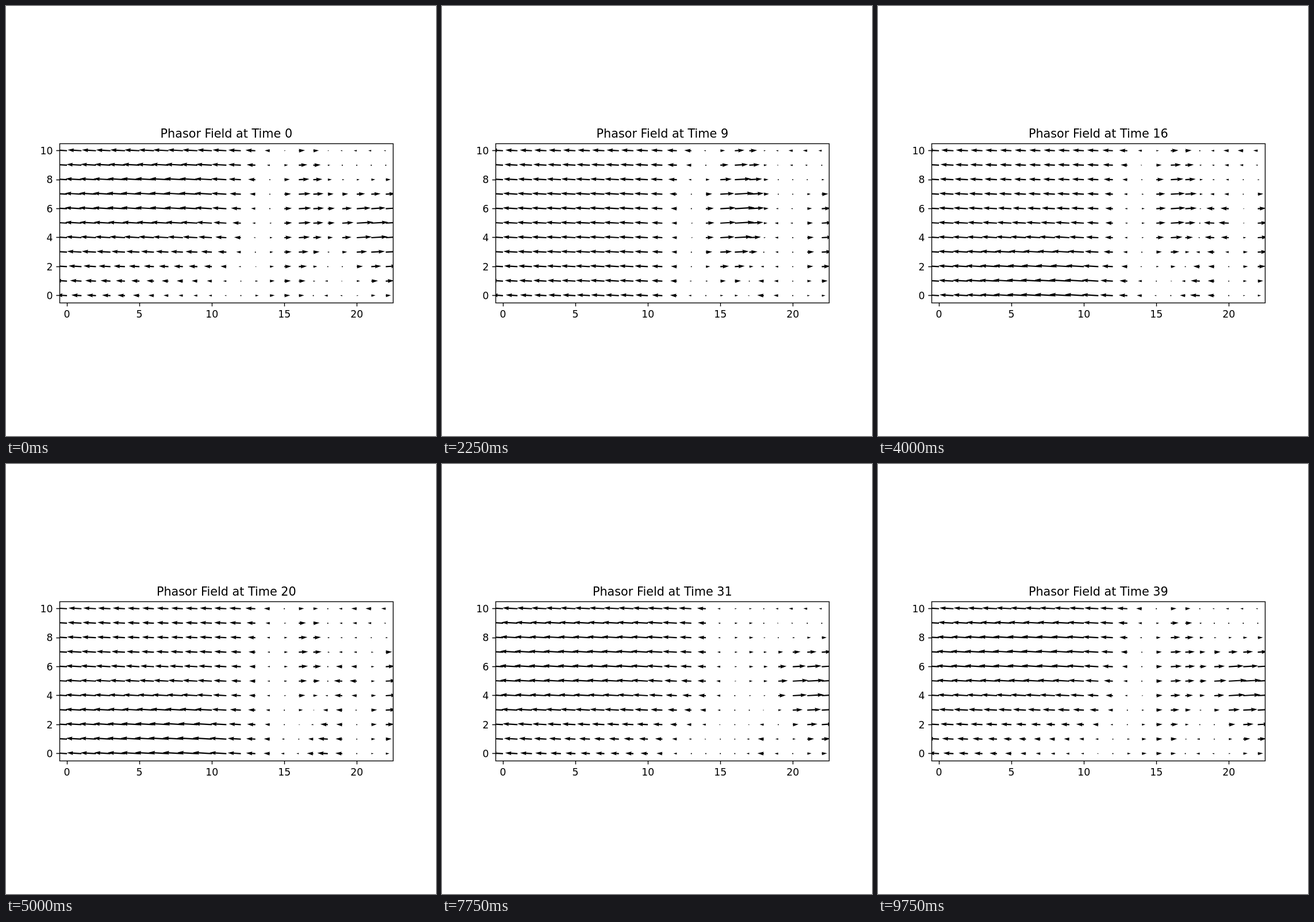
Animation, 748 px wide and 748 px high, one loop 10000 ms. Source, as an HTML page:

```html
<!DOCTYPE html>
<html lang="en">
<head>
<meta charset="utf-8">
<title>Phasor Field</title>
<style>
  html, body { margin: 0; width: 100%; height: 100%; overflow: hidden; background: #fff; }
  svg { display: block; width: 100vw; height: 100vh; }
  text { font-family: "DejaVu Sans", sans-serif; font-size: 17.31px; }
  #title { font-size: 20.78px; text-anchor: middle; }
  .x { text-anchor: middle; }
  .y { text-anchor: end; }
  .line { fill: none; stroke: #000; stroke-width: 1.385; }
</style>
</head>
<body>
<svg viewBox="0 0 748 748">
  <defs><clipPath id="box"><rect x="93.5" y="239.1" width="579.7" height="277.3"/></clipPath></defs>
  <path id="arrows" clip-path="url(#box)"/>
  <rect class="line" x="93.5" y="239.5" width="580" height="277"/>
  <path id="ticks" class="line"/>
  <g id="labels"></g>
  <text id="title" x="383.35" y="229"></text>
</svg>
<script>
const STEPS = 40, STEP_MS = 250;
const CELL = 579.7 / 23, WIDTH = 2.19, TILT = 0.06;
const LEFT = 93.5, BOTTOM = 516.4;
const px = i => LEFT + (i + 0.5) * CELL;
const py = j => BOTTOM - (j + 0.5) * CELL;
const $ = id => document.getElementById(id);

// Local sources: centre, spread, then steady flow and cosine/sine swing in pixels.
const sources = [
  { x: 9, y: 0, sx: 5, sy: 2.2, mean: 0, cos: 14, sin: -7 },
  { x: 7, y: 7.5, sx: 3.5, sy: 2.2, mean: 0, cos: -6, sin: 0 },
  { x: 14.6, y: 5, sx: 1.8, sy: 3.2, mean: 0, cos: 4, sin: 15 },
  { x: 16.3, y: 6.3, sx: 1.2, sy: 4, mean: 20, cos: 0, sin: 5 },
  { x: 18, y: 0.5, sx: 1.1, sy: 2.3, mean: -15, cos: 3, sin: 0 },
  { x: 19.7, y: 5, sx: 1.05, sy: 1.6, mean: -2, cos: 20, sin: -15 },
  { x: 22.2, y: 4.3, sx: 1.7, sy: 2.8, mean: 25, cos: 3, sin: -4 },
  { x: 21, y: 10, sx: 2, sy: 1.6, mean: -10, cos: 2, sin: 0 }
];

const bump = (s, i, j) =>
  Math.exp(-(((i - s.x) / s.sx) ** 2 + ((j - s.y) / s.sy) ** 2) / 2);

function phasor(i, j) {
  // Broad leftward stream that fades out past a curved front.
  const front = 12 + 2 * (j / 10) ** 3;
  const stream = 1 / (1 + Math.exp((i - front) / 0.9));
  const p = {
    x: px(i), y: py(j),
    mean: -(21.5 + 6.5 * Math.sin(Math.PI * j / 11)) * stream,
    cos: 0,
    sin: 2.5 * stream
  };
  for (const s of sources) {
    const g = bump(s, i, j);
    p.mean += s.mean * g;
    p.cos += s.cos * g;
    p.sin += s.sin * g;
  }
  return p;
}

const cells = [];
for (let j = 0; j < 11; j++) {
  for (let i = 0; i < 23; i++) cells.push(phasor(i, j));
}

const polygon = pts =>
  "M" + pts.map(p => p[0].toFixed(2) + " " + p[1].toFixed(2)).join("L") + "Z";

function arrow(x, y, u) {
  const len = Math.abs(u) / WIDTH;
  if (len < 1) {
    return polygon([0, 1, 2, 3, 4, 5].map(k => [
      x + WIDTH / 2 * Math.cos(k * Math.PI / 3),
      y + WIDTH / 2 * Math.sin(k * Math.PI / 3)
    ]));
  }
  // Arrows shorter than a full head shrink as a whole.
  const s = Math.min(1, len / 5), dir = Math.sign(u);
  const neck = len - 4.5 * s, barb = len - 5 * s;
  return polygon([
    [0, 0.5 * s], [neck, 0.5 * s], [barb, 1.5 * s], [len, 0],
    [barb, -1.5 * s], [neck, -0.5 * s], [0, -0.5 * s]
  ].map(([a, b]) => [
    x + dir * WIDTH * (a + TILT * b),
    y + WIDTH * (b - TILT * a)
  ]));
}

function drawAxes() {
  const snap = v => Math.floor(v) + 0.5;
  let ticks = "", labels = "";
  for (let i = 0; i <= 20; i += 5) {
    ticks += `M${snap(px(i))} ${BOTTOM}v6.06`;
    labels += `<text class="x" x="${px(i)}" y="542">${i}</text>`;
  }
  for (let j = 0; j <= 10; j += 2) {
    ticks += `M${LEFT} ${snap(py(j))}h-6.06`;
    labels += `<text class="y" x="81.4" y="${Math.round(py(j) + 6.3)}">${j}</text>`;
  }
  $("ticks").setAttribute("d", ticks);
  $("labels").innerHTML = labels;
}

function draw(step) {
  const phase = 2 * Math.PI * step / STEPS;
  const c = Math.cos(phase), s = Math.sin(phase);
  $("arrows").setAttribute("d",
    cells.map(p => arrow(p.x, p.y, p.mean + p.cos * c + p.sin * s)).join(""));
  $("title").textContent = "Phasor Field at Time " + step;
}

let shown = -1;
const origin = performance.now();
function tick() {
  const step = Math.floor(Math.max(0, performance.now() - origin) / STEP_MS) % STEPS;
  if (step !== shown) draw(shown = step);
  requestAnimationFrame(tick);
}
drawAxes();
tick();
</script>
</body>
</html>
```
